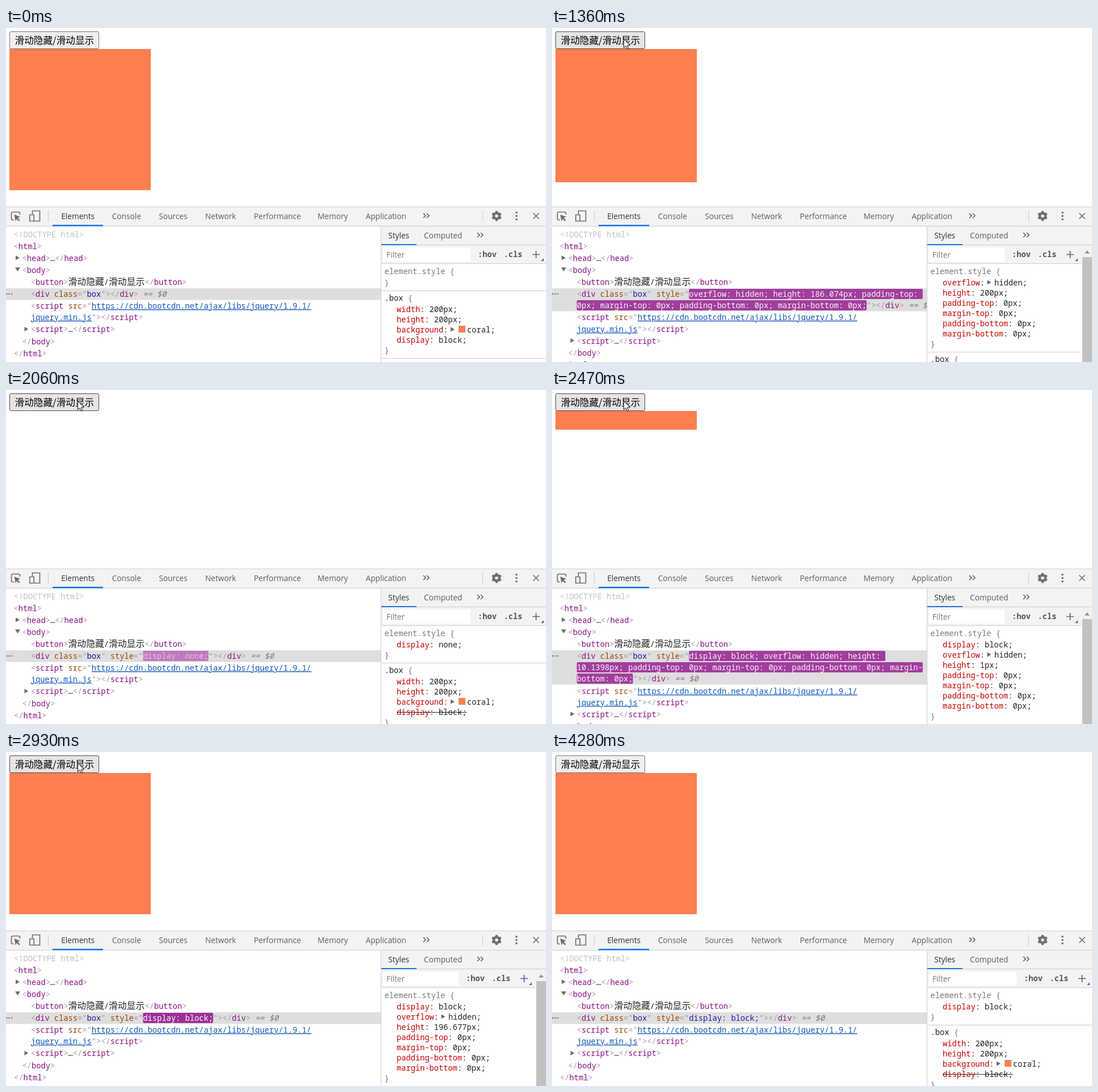
Write an HTML page that moves like this. It is 951 px wide and 589 px high and loops after 4.42 s.

```html
<!DOCTYPE html>
<html lang="zh">
<head>
<meta charset="utf-8">
<title>Slide toggle</title>
<style>
html, body { margin: 0; height: 100%; overflow: hidden; background: #fff; }
svg { display: block; width: 951px; height: 589px; }
text { white-space: pre; }
.ui { font: 13.7px "Open Sans", "Noto Sans", sans-serif; fill: #5a5d61; }
.mono { font: 13.72px "Noto Sans Mono", "DejaVu Sans Mono", monospace; fill: #222; }
.zh { font-family: "Noto Sans CJK SC", "Noto Sans CJK", sans-serif; }
.punct { fill: #a894a6; }
.tag { fill: #881280; }
.attr { fill: #994500; }
.value { fill: #1a1aa6; }
.link { fill: #1155bb; text-decoration: underline; }
.doctype { fill: #c0c0c0; }
.note { fill: #777; font-style: italic; }
.prop { fill: #c80000; }
.dim { fill: #777; }
.bold { font-weight: 600; fill: #555; }
</style>
</head>
<body>
<svg viewBox="0 0 951 589"><g id="page"></g><g id="code"></g><g id="bar"></g><g id="side"></g><g id="pointer"></g></svg>
<script>
const LOOP = 4420, CW = 8.232, INDENT = 43.7;
const steps = [0, 820, 900, 980, 1060, 1140, 1220, 1300, 1360, 1440, 1520, 1600, 1680, 1790, 1840, 1920, 1990, 2060,
  2250, 2310, 2390, 2470, 2560, 2630, 2700, 2780, 2880, 2950, 3020, 3100, 3170, 3250, 3330, 3410, 3490, 3580,
  3860, 3940, 4020, 4110, 4190, 4280];
const HIDE = 1360, NONE = 1840, SHOW = 2390, BLOCK = 2880;
const hideHeights = [200, 186.074, 148.679, 106.279, 61.0072, 15.149, 1.48602];
const showHeights = [1, 10.1398, 57.3821, 112.476, 164.524, 196.677];
const label = '滑动隐藏/滑动显示';

const $ = id => document.getElementById(id);
const esc = s => s.replace(/&/g, '&amp;').replace(/</g, '&lt;');
const span = (cls, s) => `<tspan class="${cls}">${esc(s)}</tspan>`;
const text = (x, y, cls, body, extra = '') => `<text x="${x}" y="${y}" class="${cls}" ${extra}>${body}</text>`;
const rect = (x, y, w, h, fill, extra = '') => `<rect x="${x}" y="${y}" width="${w}" height="${h}" fill="${fill}" ${extra}/>`;
const path = (d, extra) => `<path d="${d}" ${extra}/>`;
const right = (x, y) => path(`M${x} ${y - 4}l7 4-7 4z`, 'fill="#6e6e6e"');
const down = (x, y) => path(`M${x} ${y - 4}h9l-4.5 7z`, 'fill="#6e6e6e"');
const chevrons = (x, y) => path(`M${x} ${y - 4}l4 4-4 4m6-8l4 4-4 4`, 'fill="none" stroke="#5a5d61" stroke-width="1.6"');
const open = name => span('punct', '<') + span('tag', name) + span('punct', '>');
const close = name => span('punct', '</') + span('tag', name) + span('punct', '>');

// Interpolates a list of [time, ...numbers]
function track(t, keys) {
  let i = 0;
  while (i < keys.length - 2 && t > keys[i + 1][0]) i++;
  const [a, b] = [keys[i], keys[i + 1]];
  const p = Math.min(1, Math.max(0, (t - a[0]) / (b[0] - a[0])));
  return a.slice(1).map((v, k) => v + (b[k + 1] - v) * p);
}
const rgb = c => `rgb(${c.map(Math.round)})`;

const glow = [[0, 155, 48, 150], [370, 216, 168, 216], [700, 222, 222, 222]];
const glowText = [[0, 255, 255, 255], [370, 198, 164, 200], [700, 204, 200, 208], [900, 204, 200, 208], [1400, 26, 26, 166]];
const cursorPath = [[820, 227, -6], [1140, 126, 19], [2950, 126, 19], [3250, 445, 26], [3490, 870, 40]];

const swing = p => 0.5 - Math.cos(Math.PI * Math.min(1, Math.max(0, p))) / 2;
const boxHeight = t => 249 * (t < 2250 ? 1 - swing((t - 1301) / 400) : swing((t - 2375) / 400));

// Inline declarations; lag delays the sidebar by some steps
function declarations(i, lag) {
  const t = steps[i];
  const heightAt = (list, start, shift) => list[i - steps.indexOf(start) + shift];
  const sliding = h => [['overflow', 'hidden'], ['height', h + 'px'], ['padding-top', '0px'],
    ['margin-top', '0px'], ['padding-bottom', '0px'], ['margin-bottom', '0px']];
  const seen = lag && [NONE, SHOW, BLOCK].includes(t) ? steps[i - 1] : t;
  if (seen < HIDE) return [];
  if (seen < NONE) return sliding(heightAt(hideHeights, HIDE, 1 - lag) ?? 1.48602);
  if (seen < SHOW) return [['display', 'none']];
  if (seen < BLOCK) return [['display', 'block'], ...sliding(heightAt(showHeights, SHOW, -lag) ?? 196.677)];
  return [['display', 'block']];
}

function wrap(s, used, max = 74) {
  const lines = [''];
  for (const word of s.split(/(?<=[ -])/)) {
    const line = lines.at(-1);
    const room = max - (lines.length === 1 ? used : 0);
    if ((line + word).trimEnd().length > room) lines.push(word);
    else lines[lines.length - 1] += word;
  }
  return lines;
}

function drawPage(t) {
  const [x, y] = track(t, cursorPath);
  const hover = t >= 820 && t < 3580 && x < 164 && y > 5;
  const press = (t >= 1220 && t < 1300) || (t >= 2250 && t < SHOW);
  const h = boxHeight(t);
  const fill = press ? '#f5f5f5' : hover ? '#e5e5e5' : '#efefef';
  const edge = press ? '#8d8d8d' : hover ? '#4a4a4a' : '#767676';
  $('page').innerHTML = (h > 0 ? rect(6, 37, 249, Math.floor(h) || 1, '#ff7f50') : '') +
    rect(6.5, 6.5, 157, 30, fill, `stroke="${edge}" rx="2.5"`) +
    text(15.5, 28, 'zh', label, 'font-size="16.67"');
  $('pointer').innerHTML = t < 820 || t >= 3580 ? '' :
    path('M.5.5V16l3.6-3.4L6.6 18.4 9 17.4 6.5 11.8H11.3z', `fill="#fff" stroke="#111" transform="translate(${x} ${y})"`);
}

function drawCode(i) {
  const t = steps[i];
  let y = 368.5, out = '';
  const row = (x, body, gap = 21.1) => {
    out += text(x, Math.round(y), 'mono', body);
    y += gap;
  };
  row(14, span('doctype', '<!DOCTYPE html>'));
  row(13.5, open('html'));
  out += right(17, y - 5.5);
  row(28.5, open('head') + '…' + close('head'));
  out += down(16, y - 5.5);
  row(28.5, open('body'));
  const zhOpen = '<tspan class="zh" font-size="15.8">';
  row(INDENT, open('button') + zhOpen + label.replace('/', `</tspan>/${zhOpen}`) + '</tspan>' + close('button'));

  const style = declarations(i, 0).map(([k, v]) => `${k}: ${v};`).join(' ');
  const head = span('punct', '<') + span('tag', 'div ') + span('attr', 'class') + span('punct', '="') + span('value', 'box') + span('punct', '"');
  const tail = span('punct', '>') + close('div') + span('note', ' == $0');
  const lines = style ? wrap(style, 24) : [''];
  out += rect(0, 459, 660, 20.5 + 20 * (lines.length - 1), '#dedede');
  for (const x of [1.2, 5.6, 10]) out += `<circle cx="${x}" cy="469" r="1.3" fill="#777"/>`;
  if (!style) row(INDENT, head + tail);
  else {
    const age = t >= BLOCK ? t - BLOCK : t >= NONE && t < SHOW ? t - NONE : 40;
    const back = rgb(track(age, glow)), ink = rgb(track(age, glowText));
    lines.forEach((line, n) => {
      const last = n === lines.length - 1;
      const x = INDENT + (n ? 0 : 24 * CW);
      if (age < 700) out += rect(x, Math.round(y) - 14, line.length * CW, 18, back, 'rx="2"');
      row(INDENT, (n ? '' : head + span('attr', ' style') + span('punct', '="')) +
        `<tspan fill="${ink}">${line}</tspan>` + (last ? span('punct', '"') + tail : ''), last ? 21.1 : 20.2);
    });
  }
  row(INDENT, span('punct', '<') + span('tag', 'script ') + span('attr', 'src') + span('punct', '="') +
    span('link', 'https://cdn.bootcdn.net/ajax/libs/jquery/1.9.1/'), 20.2);
  row(INDENT, span('link', 'jquery.min.js') + span('punct', '">') + close('script'));
  out += right(32.5, y - 5.5);
  row(INDENT, open('script') + '…' + close('script'));
  row(28.5, close('body'));
  row(14, close('html'));
  $('code').innerHTML = rect(0, 349, 660, 240, '#fff') + out;
}

function drawSide(i) {
  const list = declarations(i, 1);
  const scroll = list.length > 1, dx = scroll ? -21 : 0, edge = scroll ? 932 : 951;
  const plus = steps[i] >= BLOCK ? '#5d5a9a' : '#666';
  let y = 433.5;
  let out = rect(660, 350, 291, 239, '#fff') + rect(660, 350, 291, 66, '#f3f3f3') +
    rect(660, 382, 291, 1, '#cacdd1') + rect(660, 415, edge - 660, 1, '#cacdd1') + rect(660, 349, 1, 240, '#cacdd1') +
    rect(661, 381, 62, 2, '#1a73e8') +
    text(673.2, 371, 'ui', 'Styles', 'style="fill:#333"') + text(736, 371, 'ui', 'Computed') + chevrons(830, 365) +
    rect(664, 387, 154 + dx, 25, '#fff') + text(670, 405, 'ui', 'Filter', 'style="fill:#757575"') +
    text(831 + dx, 404, 'mono bold', ':hov') + text(876.5 + dx, 404, 'mono bold', '.cls') +
    path(`M${927 + dx} 399.5h13m-6.5-6.5v13`, `stroke="${plus}" stroke-width="1.7"`) +
    path(`M${947 + dx} 406v5h-5z`, `fill="${plus}"`);
  const line = (x, body, gap) => {
    out += text(x, Math.round(y), 'mono', body);
    y += gap;
  };
  const rule = (selector, items, cls) => {
    line(666.5, span(cls, selector) + span('dim', ' {'), 20);
    for (const [k, v, off] of items) {
      const end = 688 + (k.length + 1) * CW;
      const arrow = k === 'overflow' || k === 'background', swatch = k === 'background';
      if (arrow) out += right(end + 4.5, y - 5);
      if (swatch) out += rect(797.5, Math.round(y) - 11.5, 11, 11, '#ff7f50', 'stroke="#d88a6c"');
      out += text(688, Math.round(y), 'mono', span('prop', k) + ':');
      out += text(swatch ? 812 : end + (arrow ? 17 : CW), Math.round(y), 'mono', v + ';');
      if (off) out += rect(688, Math.round(y) - 5, (k.length + v.length + 3) * CW, 1, '#222');
      y += 18;
    }
    line(666.5, span('dim', '}'), 0);
    out += rect(661, Math.round(y + 9.5), edge - 661, 1, '#cacdd1');
    y += 27;
  };
  rule('element.style', list, 'dim');
  rule('.box', [['width', '200px'], ['height', '200px'], ['background', 'coral'], ['display', 'block', list.length > 0]], '');
  if (scroll) out += rect(933, 384, 18, 205, '#f1f1f1') + rect(934, 404, 17, 185, '#c1c1c1') + path('M938 397.5l4.5-5 4.5 5z', 'fill="#8a8a8a"');
  $('side').innerHTML = out;
}

function drawBar() {
  const tabs = { Elements: 97.2, Console: 186.7, Sources: 269.2, Network: 350.7, Performance: 436.5, Memory: 548.7, Application: 633.5 };
  const line = 'fill="none" stroke="#6e6e6e" stroke-width="1.7"';
  let out = rect(0, 315, 951, 35, '#f3f3f3') + rect(0, 315, 951, 1, '#cacdd1') + rect(0, 349, 951, 1, '#cacdd1') +
    rect(82, 347, 89, 2.5, '#1a73e8') + rect(74, 322, 1, 20, '#ccc') + rect(839, 322, 1, 20, '#ccc');
  for (const [name, x] of Object.entries(tabs)) out += text(x, 337, 'ui', name, name === 'Elements' ? 'style="fill:#333"' : '');
  out += path('M14 338.5h-2q-2.5 0-2.5-2.5v-9q0-2.5 2.5-2.5h10q2.5 0 2.5 2.5v2', line) +
    path('M14.5 329l10.5 4-4.3 2 4 4-1.8 1.8-4-4-2 4.2z', 'fill="#6e6e6e"') +
    path('M46.5 328.5v-6h13v18h-10M41.8 329.5h7.4v11h-7.4z', line) +
    chevrons(735, 331) +
    '<circle cx="864" cy="331.5" r="5" fill="none" stroke="#6e6e6e" stroke-width="4.4"/>' +
    '<circle cx="864" cy="331.5" r="7.6" fill="none" stroke="#6e6e6e" stroke-width="2.6" pathLength="12" stroke-dasharray="1" stroke-dashoffset="-.5"/>';
  for (const y of [325.5, 331.5, 337.5]) out += `<circle cx="899" cy="${y}" r="1.8" fill="#6e6e6e"/>`;
  $('bar').innerHTML = out + path('M928.5 326.5l10 10m0-10l-10 10', line);
}

let shown = -1;
function frame(now) {
  const t = now % LOOP;
  const i = steps.findLastIndex(s => s <= t);
  if (i !== shown) {
    shown = i;
    drawPage(steps[i]);
    drawCode(i);
    drawSide(i);
  }
  requestAnimationFrame(frame);
}
drawBar();
frame(0);
</script>
</body>
</html>
```
